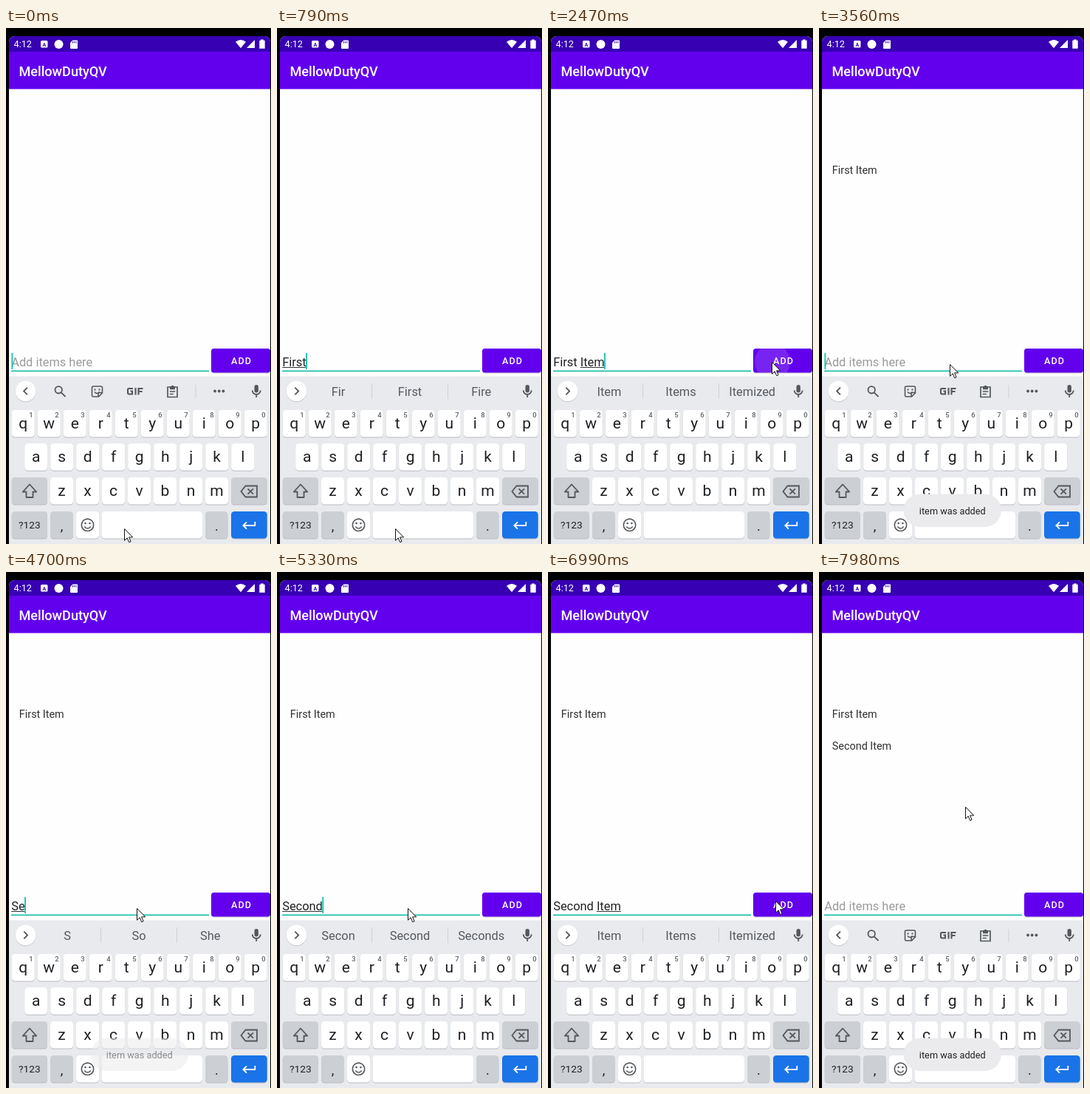
Write an HTML page that moves like this. It is 359x697 px and loops after 8000 ms.

```html
<!DOCTYPE html>
<html lang="en">
<head>
<meta charset="utf-8">
<title>Todo list demo</title>
<style>
html, body { margin: 0; width: 100%; height: 100%; overflow: hidden; background: #000; }
svg { display: block; width: 100vw; height: 100vh; font-family: Roboto, sans-serif; }
text { white-space: pre; }
.ico { fill: none; stroke: #54575b; stroke-width: 1.8; }
.solid { fill: #54575b; stroke: none; }
</style>
</head>
<body>
<svg id="stage" viewBox="0 0 359 697">
  <defs>
    <clipPath id="screen"><path d="M4 697V19a8 8 0 0 1 8-8H350a8 8 0 0 1 8 8V697z"/></clipPath>
    <clipPath id="btn"><rect x="278" y="433" width="80" height="32.5" rx="3.5"/></clipPath>
  </defs>
  <rect width="359" height="697" fill="#000"/>
  <g clip-path="url(#screen)">
    <rect x="4" y="11" width="354" height="686" fill="#fefefe"/>
    <rect x="4" y="11" width="354" height="22" fill="#3700b3"/>
    <rect x="4" y="32" width="354" height="50.5" fill="#6200ee"/>
    <g fill="#fff">
      <text x="10.5" y="26.3" font-size="12.7">4:12</text>
      <rect x="47" y="17" width="9.5" height="9.5" rx="1.5"/>
      <text x="51.8" y="24.5" font-size="7" font-weight="700" text-anchor="middle" fill="#3700b3">A</text>
      <circle cx="71.5" cy="22" r="6"/>
      <path d="M90.5 16.5H96a1 1 0 0 1 1 1V27a1 1 0 0 1-1 1H88a1 1 0 0 1-1-1V20z"/>
      <path d="M90.5 18v2.5M92.7 18v2.5M94.9 18v2.5" stroke="#3700b3" stroke-width="1"/>
      <path d="M311 18.8Q318 13.3 325 18.8L318 27.3z"/>
      <path d="M337 16V27H326z"/>
      <path d="M345.300 15.500h3.400v1.300h2v11h-7.400v-11h2z"/>
    </g>
    <text x="17.5" y="65" font-size="18.1" font-weight="500" fill="#fff">MellowDutyQV</text>

    <g font-size="14.4" fill="#2f2f2f">
      <text id="row1" x="17.8" y="196.700">First Item</text>
      <text id="row2" x="17.8" y="240">Second Item</text>
    </g>

    <text id="hint" x="7.2" y="456.700" font-size="16.4" fill="#9b9b9b">Add items here</text>
    <text id="field" x="7.200" y="456.700" font-size="16.4" fill="#212121"></text>
    <rect id="under" y="458" height="1" fill="#333"/>
    <rect x="7" y="462.500" width="268" height="1.800" fill="#27bfae"/>
    <rect id="caret" y="439" width="1.900" height="22" fill="#1cc4b2"/>

    <rect x="278.500" y="434" width="79" height="32.500" rx="3.500" fill="#000" opacity=".22"/>
    <g clip-path="url(#btn)">
      <rect x="278" y="433" width="80" height="33" fill="#6200ee"/>
      <circle id="ripple" cx="304" cy="451" fill="#fff"/>
    </g>
    <text x="305" y="453.900" font-size="12.600" font-weight="500" letter-spacing="1.120" fill="#fff">ADD</text>

    <rect x="4" y="470.500" width="354" height="227" fill="#e8eaed"/>
    <g id="keys"></g>
    <circle cx="26.500" cy="491.300" r="14" fill="#000" opacity=".14"/>
    <circle cx="26.500" cy="490.500" r="13.800" fill="#fff"/>
    <path id="chevron" class="ico"/>

    <g id="tools" class="ico">
      <circle cx="71.200" cy="488.800" r="4.700"/><path d="M74.700 492.300L80.500 498"/>
      <path d="M118.500 484H128.500a2 2 0 0 1 2 2V493L125.500 498H118.500a2 2 0 0 1-2-2V486a2 2 0 0 1 2-2zM130 492.500H127a2 2 0 0 0-2 2V498" stroke-width="1.600"/>
      <path d="M120 491.500q3 4 6.500 0" stroke-width="1.400"/>
      <path class="solid" d="M119.500 487.500h2v2h-2zM125.500 487.500h2v2h-2z"/>
      <path d="M172 487H166.500a1.500 1.500 0 0 0-1.500 1.500V493a1.500 1.500 0 0 0 1.500 1.500H171V490.500H168.500M175.500 486V495.500M179.500 495.500V487H185.500M179.500 491H184.500" stroke-width="2.100"/>
      <path d="M219 485H232V498.500H219z" stroke-width="1.700"/>
      <path class="solid" d="M222 484h1.800a1.900 1.900 0 0 1 3.500 0H229V488.300H222z"/>
      <path d="M221.800 491h7.500M221.800 494.500h5" stroke-width="1.400"/>
      <path d="M257 482V500" stroke="#cfd1d5" stroke-width="1"/>
      <g class="solid"><circle cx="283" cy="490.500" r="1.900"/><circle cx="288.700" cy="490.500" r="1.900"/><circle cx="294.400" cy="490.500" r="1.900"/></g>
    </g>
    <g id="words" font-size="16.400" text-anchor="middle" fill="#565a5f">
      <text x="83" y="497"></text><text x="180" y="497"></text><text x="276.700" y="497"></text>
      <path d="M128.500 480V501M231.500 480V501" stroke="#cfd1d5"/>
    </g>
    <rect class="solid" x="336.500" y="482" width="5.400" height="10.500" rx="2.700"/>
    <path class="ico" d="M333.700 489.500a5.500 5.500 0 0 0 11 0M339.200 495V499" stroke-width="1.600"/>

    <g class="ico">
      <path d="M32 616.500L22.800 626.500H27.500V634H36.500V626.500H41.200z" stroke-linejoin="round"/>
      <path d="M318.500 626L324.500 618.500H340V633.500H324.500zM327.500 622.300L335 629.700M335 622.300L327.500 629.700"/>
      <circle cx="110.500" cy="671.300" r="8.200" stroke-width="1.600"/>
      <path d="M106.300 673.500q4.200 5 8.400 0" stroke-width="1.500"/>
      <g class="solid"><circle cx="107.600" cy="669" r="1.300"/><circle cx="113.400" cy="669" r="1.300"/></g>
      <path d="M337.300 667V672H321.500M326 667.300L321.300 672L326 676.700" style="stroke:#fff"/>
    </g>

    <g id="toast">
      <rect x="114.500" y="629.500" width="132.500" height="44.500" rx="22.200" fill="#ebebed"/>
      <text x="180.800" y="656.500" font-size="12.750" text-anchor="middle" fill="#222">item was added</text>
    </g>
  </g>
  <path id="mouse" d="M.5 .5V16.300L4.200 12.800L6.700 18.700L9.100 17.700L6.600 11.900H11.700z" fill="#fff" stroke="#111" stroke-width="1"/>
</svg>
<script>
const $ = id => document.getElementById(id);
const LOOP = 8000;

function add(tag, attrs, label = '') {
  const el = document.createElementNS('http://www.w3.org/2000/svg', tag);
  for (const k in attrs) el.setAttribute(k, attrs[k]);
  el.textContent = label;
  $('keys').append(el);
}

function key(x, y, w, fill, label = '', size = 21, base = 25) {
  add('rect', { x, y: y + 1, width: w, height: 36.5, rx: 4.5, fill: '#b9bcc1' });
  add('rect', { x, y, width: w, height: 36.5, rx: 4.5, fill });
  if (label) add('text', { x: x + w / 2, y: y + base, 'font-size': size, 'text-anchor': 'middle', fill: '#1f2023' }, label);
}

const WHITE = '#fff', GREY = '#cccfd4';
[['qwertyuiop', 7.7, 516], ['asdfghjkl', 25.2, 561.3], ['zxcvbnm', 60, 607]].forEach(([row, x, y]) =>
  [...row].forEach((ch, i) => key(x + 35 * i, y, 31, WHITE, ch)));
[...'1234567890'].forEach((n, i) =>
  add('text', { x: 34 + 35 * i, y: 526.3, 'font-size': 9.5, 'font-weight': 500, 'text-anchor': 'middle', fill: '#5f6368' }, n));
key(7.7, 607, 48.3, GREY);
key(305, 607, 48.7, GREY);
key(7.7, 653, 48.3, GREY, '?123', 13.7, 23);
key(60, 653, 31, GREY, ',', 18, 26);
key(95, 653, 31, WHITE);
key(129.5, 653, 136.5, WHITE);
key(270, 653, 30.5, GREY, '.', 18, 26);
key(305, 653, 48.7, '#1a73e8');

// Each step changes only the listed parts of the state.
const start = { text: '', words: '', mouse: [160, 676], caret: 1, ripple: [0, 0], row1: 0, row2: 0, toast: 0 };
const steps = [
  [280, { text: 'F' }],
  [430, { text: 'Fi', words: 'F|For|From' }],
  [550, { text: 'Fir', words: 'Fi|First|Find' }],
  [700, { text: 'First', words: 'Fir|First|Fire' }],
  [820, { text: 'First ', words: 'First|Firsts|Firstly' }],
  [970, { text: 'First I', words: 'of|the|time' }],
  [1090, { text: 'First Ite', words: 'I|I\'m|It' }],
  [1240, { text: 'First Item', words: 'Ite|Item|Items' }],
  [1390, { words: 'Item|Items|Itemized' }],
  [1660, { mouse: [192, 672] }],
  [1780, { mouse: [232, 612] }],
  [1930, { mouse: [274, 532] }],
  [2050, { mouse: [296, 475] }],
  [2200, { mouse: [302, 454] }],
  [2320, { mouse: [303, 451] }],
  [2470, { ripple: [24, .14] }],
  [2590, { text: '', row1: .5, ripple: [60, .14] }],
  [2740, { words: '', row1: 1, toast: .4, ripple: [80, .07] }],
  [2860, { mouse: [284, 452], toast: 1, ripple: [0, 0] }],
  [3010, { mouse: [235, 455] }],
  [3130, { mouse: [190, 455], caret: 0 }],
  [3280, { mouse: [177, 454] }],
  [3560, { caret: 1 }],
  [3990, { caret: 0 }],
  [4550, { caret: 1, text: 'S' }],
  [4700, { text: 'Se', words: 'S|So|She', toast: .5 }],
  [4820, { text: 'Sec', words: 'Se|See|Send', toast: 0 }],
  [4940, { text: 'Seco', words: 'Sec|Second|Section' }],
  [5090, { text: 'Secon', words: 'Seco|Second|Seconds' }],
  [5210, { text: 'Second', words: 'Seco|Second|Seconds' }],
  [5330, { words: 'Secon|Second|Seconds' }],
  [5450, { words: 'Second|Seconds|Secondary' }],
  [5600, { text: 'Second ' }],
  [5720, { text: 'Second I', words: 'time|one|half' }],
  [5870, { text: 'Second Ite', words: 'I|I\'m|It' }],
  [5990, { text: 'Second Item', words: 'Ite|Item|Items' }],
  [6140, { words: 'Item|Items|Itemized' }],
  [6570, { mouse: [200, 452], caret: 0 }],
  [6720, { mouse: [258, 447] }],
  [6840, { mouse: [300, 444] }],
  [6990, { mouse: [308, 444] }],
  [7140, { ripple: [24, .14], caret: 1 }],
  [7260, { text: '', row2: .5, ripple: [60, .14] }],
  [7410, { words: '', row2: 1, ripple: [80, .07] }],
  [7530, { toast: .4, ripple: [0, 0] }],
  [7680, { mouse: [255, 350], toast: 1, caret: 0 }],
  [7830, { mouse: [208, 280] }],
  [7980, { mouse: [198, 317] }]
];

const field = $('field'), slots = $('words').querySelectorAll('text');
const show = (id, alpha) => $(id).setAttribute('opacity', +alpha);

function widthOf(s) {
  field.textContent = s;
  return s ? field.getComputedTextLength() : 0;
}

function draw({ text, words, mouse, caret, ripple, row1, row2, toast }) {
  const wordAt = text.lastIndexOf(' ') + 1;
  const left = widthOf(text.slice(0, wordAt)), right = widthOf(text);
  $('under').setAttribute('x', 7.2 + left);
  $('under').setAttribute('width', Math.max(0, right - left));
  $('caret').setAttribute('x', 7.4 + (right && right - .8));
  show('caret', caret);
  show('hint', !text);

  show('tools', !words);
  show('words', !!words);
  words.split('|').forEach((w, i) => slots[i].textContent = w);
  $('chevron').setAttribute('d', words ? 'M24.3 485.7L29.1 490.500L24.3 495.300' : 'M28.900 485.700L24.100 490.500L28.900 495.300');

  show('row1', row1);
  show('row2', row2);
  show('toast', toast);
  $('ripple').setAttribute('r', ripple[0]);
  show('ripple', ripple[1]);
  $('mouse').setAttribute('transform', `translate(${mouse})`);
}

const t0 = performance.now();
let last = -1;
function tick() {
  const t = (performance.now() - t0) % LOOP;
  const due = steps.filter(([at]) => at <= t);
  if (due.length !== last) {
    last = due.length;
    draw(Object.assign({}, start, ...due.map(([, change]) => change)));
  }
  requestAnimationFrame(tick);
}
tick();
</script>
</body>
</html>
```
